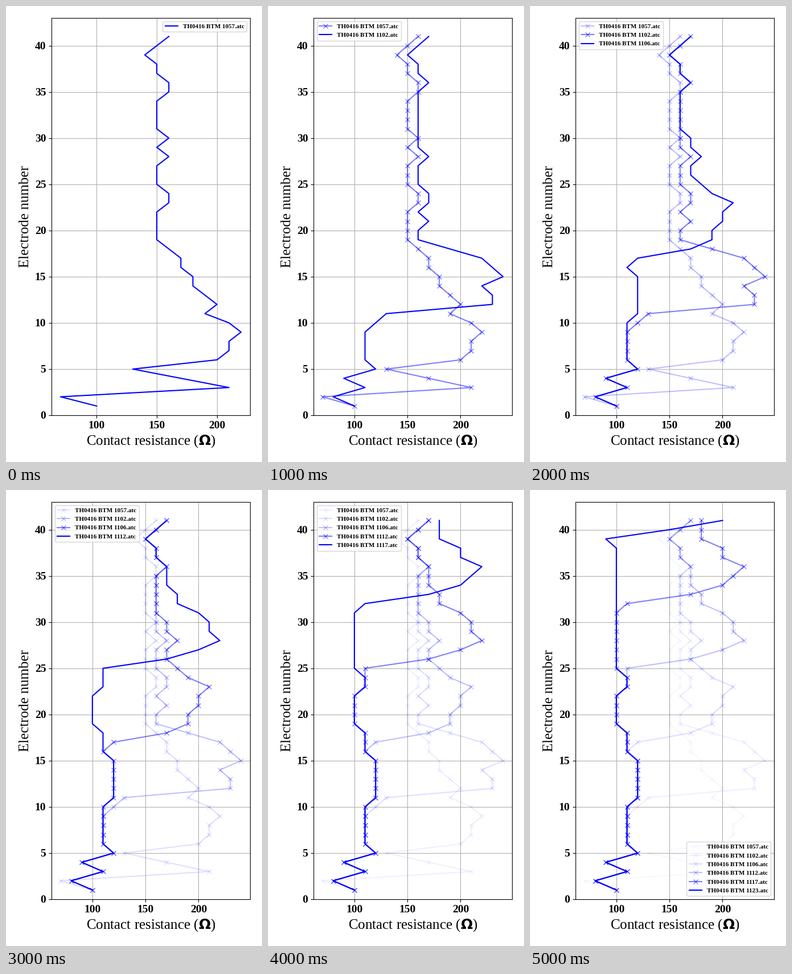
A matplotlib script that plays this animation: 450 px wide and 800 px high, repeating every 6 s.

```python
import matplotlib.pyplot as plt
import numpy as np
from matplotlib.animation import FuncAnimation

W, H, DPI = 450, 800, 100
LEFT, TOP, RIGHT, BOTTOM = 80, 21, 429, 718

plt.rcParams.update({
    "font.family": "Liberation Serif",
    "font.weight": "bold",
    "mathtext.fontset": "dejavusans",
    "legend.fontsize": 8,
    "xtick.labelsize": 14,
    "ytick.labelsize": 14,
})

electrode = np.arange(1, 42)

# Time of each survey and the corners of its rising front (electrode, ohm)
fronts = {
    1057: [(1, 100), (2, 70), (3, 210), (5, 130), (6, 200), (9, 220),
           (11, 190), (12, 198), (19, 152)],
    1102: [(9, 110), (11, 130), (12, 230), (14, 220), (15, 240), (17, 220),
           (19, 160)],
    1106: [(16, 110), (17, 120), (18, 170), (19, 188), (23, 206), (24, 190),
           (26, 174), (28, 175), (31, 164)],
    1112: [(25, 110), (26, 170), (28, 220), (29, 212), (31, 200), (32, 184),
           (36, 165)],
    1117: [(32, 110), (33, 170), (34, 200), (36, 220), (37, 200), (38, 200),
           (39, 180), (41, 180)],
    1123: [(38, 100), (39, 90), (41, 200)],
}


def below_front():
    """Settled readings: a zigzag start, one slow wave, then a flat top."""
    wave = 110.5 + 10 * np.cos(2 * np.pi * (electrode - 13) / 15)
    ohm = np.where(electrode < 10, 110, np.where(electrode > 24, 100, wave))
    ohm[:5] = 100, 80, 110, 90, 120
    return ohm


def above_front(level, bumps):
    """A steady level with single steps up and one step down."""
    return level + 10 * np.isin(electrode, bumps) - 10 * (electrode == 39)


def survey(time):
    x, y = zip(*fronts[time])
    if time == 1057:
        top = above_front(150, [23, 24, 28, 30, 35, 36, 41])
    else:
        top = above_front(160, [21, 23, 24, 28, 36, 41])
    ohm = np.interp(electrode, x, y)
    ohm = np.where(electrode < x[0], below_front(), ohm)
    ohm = np.where(electrode > x[-1], top, ohm)
    return 10 * np.floor(ohm / 10 + 0.5)  # the meter reads in tens


times = list(fronts)
surveys = [survey(t) for t in times]
last = len(times) - 1

fig = plt.figure(figsize=(W / DPI, H / DPI), dpi=DPI, facecolor="white")
ax = fig.add_axes([LEFT / W, 1 - BOTTOM / H,
                   (RIGHT - LEFT) / W, (BOTTOM - TOP) / H])


def legend_place(n):
    if n == 0:
        return "upper right"
    return "lower right" if n == last else "upper left"


def draw(n):
    ax.clear()
    for k in range(n + 1):
        # Each older survey fades to half the strength of the next
        ax.plot(surveys[k], electrode, color="blue", lw=1.5,
                alpha=0.5 ** (n - k), marker="x" if k < n else None,
                label=f"TH0416 BTM {times[k]}.atc")
    ax.set_ylim(0, 43)
    ax.set_xticks([100, 150, 200])
    ax.set_yticks(range(0, 41, 5))
    ax.grid(True)
    ax.set_xlabel(r"Contact resistance ($\mathbf{\Omega}$)",
                  fontsize=18, weight="normal")
    ax.set_ylabel("Electrode number", fontsize=18, weight="normal")
    ax.legend(loc=legend_place(n))
    return ax.get_children()


anim = FuncAnimation(fig, draw, frames=len(times), interval=1000,
                     repeat=True, repeat_delay=0, blit=False)
plt.show()
```
